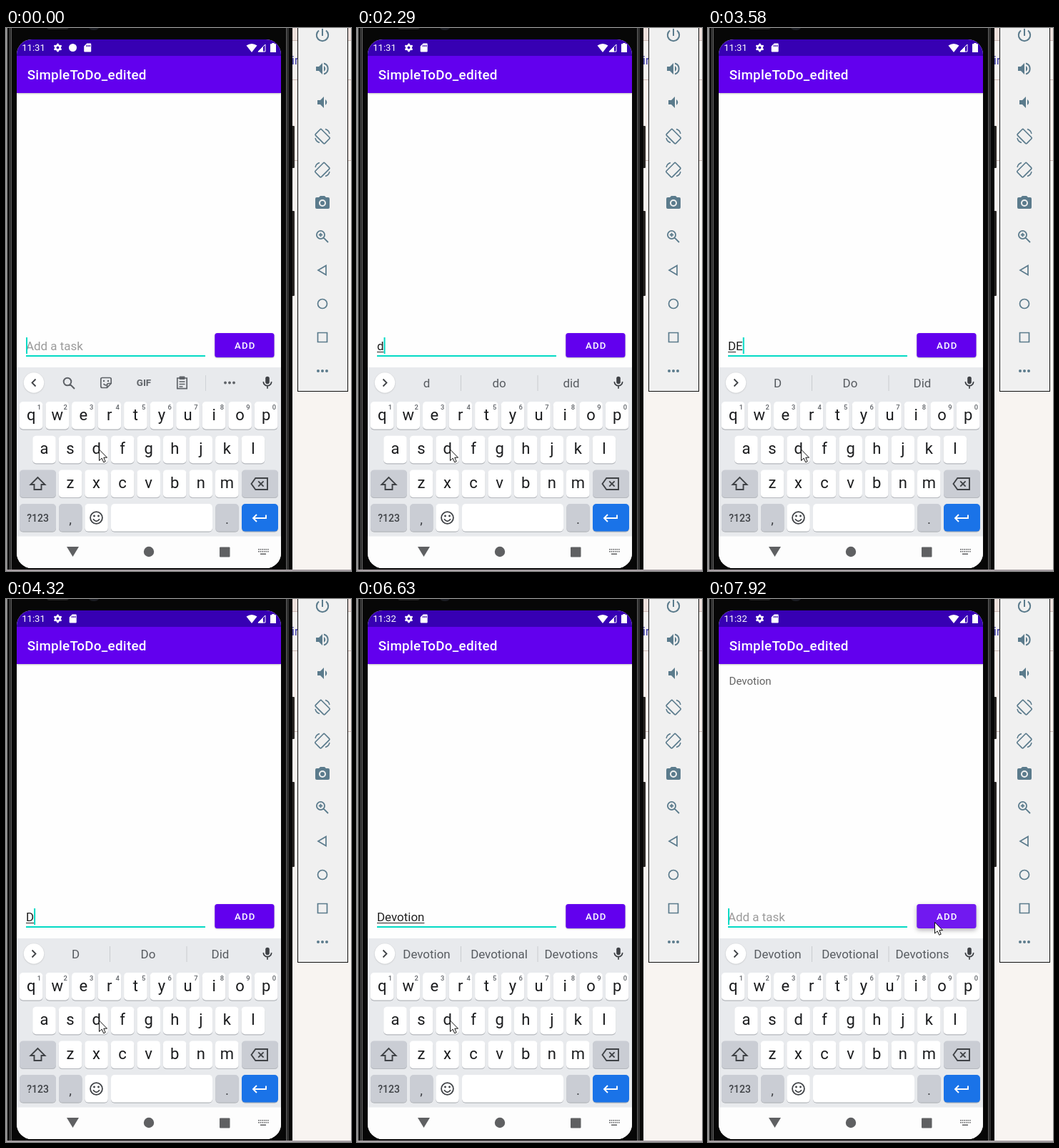
These frames come from a looping animation (483 by 760 pixels, 8000 ms). An HTML page with a canvas:

```html
<!DOCTYPE html>
<html lang="en">
<head>
<meta charset="utf-8">
<title>To-do app in a phone emulator</title>
<style>
html, body { margin: 0; width: 100%; height: 100%; overflow: hidden; }
canvas { display: block; }
</style>
</head>
<body>
<canvas id="stage" width="483" height="760"></canvas>
<script>
const ctx = document.getElementById('stage').getContext('2d');
const LOOP = 8000;
const TEAL = '#03dac5', PURPLE = '#6200ee', SLATE = '#5b7b8c', INK = '#3f4246', GREY = '#5f6368';

// time, text, underlined letters, caret on, suggestions (empty: tool row)
const typing = [
  [0, '', 0, 1, ''], [410, '', 0, 0, ''], [920, '', 0, 1, ''], [1420, '', 0, 0, ''], [1920, '', 0, 1, ''],
  [2170, 'd', 0, 1, ''], [2290, 'd', 1, 1, 'd do did'], [2660, 'd', 1, 0, 'd do did'],
  [3040, '', 0, 1, 'd do did'], [3180, '', 0, 1, ''],
  [3430, 'D', 0, 1, ''], [3580, 'DE', 1, 1, 'D Do Did'],
  [3830, 'DEV', 2, 1, 'D Do Did'], [3950, 'DEV', 3, 1, 'DEV DE DEVOTION'],
  [4200, 'DE', 2, 1, 'DEV DE DEVOTION'], [4320, 'D', 1, 1, 'D Do Did'],
  [4470, 'De', 1, 1, 'D Do Did'], [4620, 'Dev', 2, 1, 'De Dear Designed'],
  [4870, 'Dev', 3, 1, 'Dev De Deb'], [5250, 'Devo', 3, 1, 'Dev De Deb'],
  [5500, 'Devot', 4, 1, 'Devo Devote Devotion'], [5620, 'Devoti', 4, 1, 'Devo Devote Devotion'],
  [5740, 'Devotio', 4, 1, 'Devo Devote Devotion'], [5860, 'Devotion', 4, 1, 'Devo Devote Devotion'],
  [6110, 'Devotion', 8, 1, 'Devotion Devotional Devotions'],
  [6630, 'Devotion', 8, 0, 'Devotion Devotional Devotions'],
  [7020, 'Devotion', 8, 1, 'Devotion Devotional Devotions'],
  [7560, '', 0, 1, 'Devotion Devotional Devotions']
];
const pointer = [[0, 130.5, 590], [6750, 150, 573], [6870, 223, 512], [7020, 287, 491], [7170, 310, 465], [7300, 317.5, 452.5]];
const notice = [[0, 1], [410, .5], [530, .06], [670, 0]];

const at = (list, t) => list.findLast(row => row[0] <= t).slice(1);
const clamp = v => Math.max(0, Math.min(1, v));

function rect(x, y, w, h, color, r = 0) {
  ctx.fillStyle = color;
  ctx.beginPath();
  ctx.roundRect(x, y, w, h, r);
  ctx.fill();
}
function disc(x, y, r, color) {
  rect(x - r, y - r, 2 * r, 2 * r, color, r);
}
function text(s, x, y, size, color, align = 'center', weight = 400, spacing = 0) {
  ctx.font = `${weight} ${size}px Roboto, sans-serif`;
  ctx.letterSpacing = spacing + 'px';
  ctx.textAlign = align;
  ctx.fillStyle = color;
  ctx.fillText(s, x, y);
}
// Icon paths are centred on 0,0.
function icon(x, y, path, color, width = 0, flip = 1) {
  ctx.save();
  ctx.translate(x, y);
  ctx.scale(flip, 1);
  ctx.fillStyle = ctx.strokeStyle = color;
  ctx.lineWidth = width;
  const p = new Path2D(path);
  if (width) ctx.stroke(p); else ctx.fill(p, 'evenodd');
  ctx.restore();
}
function dots(x, y, gap, r, color) {
  for (const i of [-1, 0, 1]) disc(x + i * gap, y, r, color);
}
function withShadow(color, blur, dy, draw) {
  ctx.save();
  ctx.shadowColor = color;
  ctx.shadowBlur = blur;
  ctx.shadowOffsetY = dy;
  draw();
  ctx.restore();
}

function drawDesktop() {
  rect(0, 0, 483, 760, '#f8f4f1');
  rect(400, 0, 83, 18, '#eee0dc');
  rect(400, 73, 83, 112, '#faf0ec');
  for (const y of [17, 72, 185]) rect(400, y, 83, 1, '#cdb9b4');
  text('ir', 400, 51, 16, '#3030a0', 'left');
  rect(400, 137, 4, 59, '#2a2725', 1);
  rect(400, 256, 4, 119, '#2a2725', 1);
}

function drawPhone() {
  rect(0, 0, 401, 758, '#070707');
  rect(0, 0, 2, 758, '#8d8d8d');
  for (const side of [-1, 1]) {
    rect(198.5 + side * 194.5, 0, 3, 758, '#303030');
    rect(199.5 + side * 192.5, 0, 1, 758, '#5c5c5c');
  }
  rect(57, -5, 31, 7, '#242424', 4);
  rect(115, -10, 16, 13, '#1a1c22', 8);
  rect(0, 758, 483, 2, '#a79fa4');
}

function drawEmulatorBar() {
  rect(408, -2, 71, 511, '#111');
  rect(409, -2, 69, 510, '#f0f0f0');
  const x = 443, c = SLATE;
  icon(x, 10, 'M0-9V1M-5-6.5A8.2 8.2 0 1 0 5-6.5', c, 2);
  icon(x, 57, 'M-9-3v6h4l5 5V-8l-5 5zM2-4a4.6 4.6 0 0 1 0 8z', c);
  icon(x, 57, 'M2-7.5A7.8 7.8 0 0 1 2 7.5', c, 2);
  icon(x, 104, 'M-7-3v6h4l5 5V-8l-5 5zM4-4a4.6 4.6 0 0 1 0 8z', c);
  for (const [y, flip] of [[151, 1], [198, -1]]) {
    icon(x, y, 'M-9.5-2.7L-3.2-9q1-1 2 0L9.8 2q1 1 0 2L3.5 10.3q-1 1-2 0L-9.5-.7q-1-1 0-2z', c, 1.7, flip);
    icon(x, y, 'M4-9.5Q9-8 10-3M-4 9.5Q-9 8-10 3', c, 1.5, flip);
  }
  icon(x, 244, 'M-3-9L-5-7h-3q-2 0-2 2V7q0 2 2 2h16q2 0 2-2V-5q0-2-2-2H5L3-9zM0-4a5 5 0 1 1 0 10a5 5 0 1 1 0-10z', c);
  disc(x, 245, 3, c);
  icon(x - 2.5, 289.5, 'M-5.6 0a5.6 5.6 0 1 0 11.2 0a5.6 5.6 0 1 0-11.2 0M-2.7 0h5.4M0-2.7v5.4M4.2 4.2L10.5 10.5', c, 1.8);
  icon(x, 339, 'M5-6.5V6.5L-6 0z', c, 1.7);
  icon(x, 386, 'M-6.5 0a6.5 6.5 0 1 0 13 0a6.5 6.5 0 1 0-13 0', c, 1.7);
  icon(x, 433, 'M-6.5-6.5h13v13h-13z', c, 1.7);
  dots(x, 480, 6, 2, c);
}

function drawHeader(t) {
  withShadow('rgba(0,0,0,.25)', 2, .5, () => rect(15, 39, 370, 52, PURPLE));
  rect(15, 16, 370, 23, '#3700b3');
  text(t < 4470 ? '11:31' : '11:32', 22.2, 32.3, 13.1, '#fff', 'left');

  icon(72.5, 27.5, 'M-3.2 0a3.2 3.2 0 1 0 6.4 0a3.2 3.2 0 1 0-6.4 0', '#fff', 2.6);
  for (let i = 0; i < 6; i++) {
    const a = i * Math.PI / 3 + Math.PI / 6;
    disc(72.5 + 4.7 * Math.cos(a), 27.5 + 4.7 * Math.sin(a), 1.3, '#fff');
  }
  const [p] = at(notice, t);
  if (p) disc(93.5, 27.5, 5.5 * p, '#fff');
  const card = 93.7 + 20.5 * p;
  icon(card, 27.5, 'M-1-6h5q1 0 1 1V5q0 1-1 1h-8q-1 0-1-1V-2zM-1.8-3.8v2.6h1.2v-2.6zM.4-3.8v2.6h1.2v-2.6zM2.6-3.8v2.6h1.2v-2.6z', '#fff');

  icon(344, 28, 'M0 6L-7.5-3.5Q0-8.5 7.5-3.5z', '#fff');
  icon(358, 28, 'M5-5V5H-5z', '#fff', 1);
  icon(358, 28, 'M2-2V5.5H-5.5z', '#fff');
  icon(374, 27.5, 'M-1.7-6.5h3.4v1.3H4V6.5h-8V-5.2h2.3z', '#fff');

  text('SimpleToDo_edited', 29.7, 72.2, 18.84, '#fff', 'left', 500, .27);
}

function drawForm(t, [value, underlined, caret]) {
  if (t >= 7680) {
    ctx.globalAlpha = t < 7800 ? .5 : 1;
    text('Devotion', 29.5, 120, 15.07, '#646464', 'left');
    ctx.globalAlpha = 1;
  }
  text(value || 'Add a task', 28, 451.3, 16.96, value ? '#222' : '#9b9b9b', 'left');
  if (underlined) rect(28, 453, ctx.measureText(value.slice(0, underlined)).width, 1, '#222');
  const end = value ? ctx.measureText(value).width : 0;
  if (caret) rect(28 + end, 433, 2, 23, TEAL);
  rect(28, 458, 251, 2, TEAL);

  const pressed = t >= 7440;
  withShadow('rgba(0,0,0,.3)', pressed ? 6 : 2, pressed ? 2.5 : .8, () => rect(292.3, 427, 83.2, 34, PURPLE, 3.5));
  if (pressed) {
    ctx.save();
    ctx.beginPath();
    ctx.roundRect(292.3, 427, 83.2, 34, 3.5);
    ctx.clip();
    const alpha = .24 - .14 * clamp((t - 7680) / 240);
    disc(318, 453, 12 + 58 * clamp((t - 7440) / 240), `rgba(255,255,255,${alpha})`);
    ctx.restore();
  }
  text('ADD', 320, 449, 13.2, '#fff', 'left', 500, 1.2);
}

function drawStrip(suggestions) {
  withShadow('rgba(0,0,0,.2)', 2, .5, () => disc(39, 496.5, 14.2, '#fff'));
  icon(39, 496.5, 'M2.5-5L-2.5 0 2.5 5', INK, 1.8, suggestions ? -1 : 1);
  icon(366, 496.5, 'M-2.8-6a2.8 2.8 0 0 1 5.6 0v5a2.8 2.8 0 0 1-5.6 0z', INK);
  icon(366, 496.5, 'M-5.7-1.5a5.7 5.7 0 0 0 11.4 0M0 4.5V8.3', INK, 1.7);
  if (suggestions) {
    suggestions.split(' ').forEach((word, i) => text(word, [97.5, 199, 300][i], 503.3, 16.96, '#585c61'));
    for (const x of [145, 252.5]) rect(x, 486, 1, 22, '#c9ccd0');
    return;
  }
  const c = GREY;
  icon(86, 495, 'M-5.3 0a5.3 5.3 0 1 0 10.6 0a5.3 5.3 0 1 0-10.6 0M4 4L10 10', c, 2);
  icon(140, 496.5, 'M7.2 1V-5q0-2-2-2h-10.4q-2 0-2 2V5q0 2 2 2H1.5zM1.5 7V3q0-2 2-2h3.7M-3.5 1.5q2 2.5 4 1.5', c, 1.7);
  disc(137, 494, 1.2, c);
  disc(143, 494, 1.2, c);
  text('GIF', 193, 501.3, 13.4, c, 'center', 700);
  icon(246.5, 497, 'M-6.7-7h13.4V7.7h-13.4zM-4-2h8M-4 1.5h8M-4 5h5', c, 1.7);
  rect(242.5, 487.5, 8, 4.5, c, 1);
  rect(279, 486, 1, 22, '#d0d3d7');
  dots(313, 496.5, 6, 1.9, c);
}

const PITCH = 36.55, ROW = 47.7;
function key(x, row, w, color = '#fff') {
  const y = 523 + row * ROW;
  rect(x, y + 1, w, 38.7, '#b4b7bc', 5);
  rect(x, y, w, 38.5, color, 5);
}

function drawKeyboard(t, suggestions) {
  rect(15, 475, 370, 237, '#e8eaed');
  drawStrip(suggestions);
  const upper = t >= 3430 && t < 3580;
  ['qwertyuiop', 'asdfghjkl', 'zxcvbnm'].forEach((letters, row) => {
    [...letters].forEach((letter, i) => {
      const x = [35.2, 53.5, 90][row] + i * PITCH;
      key(x - 16.3, row, 32.6);
      text(upper ? letter.toUpperCase() : letter, x, [549, 596, 644][row], 22, '#1b1c1e');
      if (!row) text((i + 1) % 10, x + 11.3, 534, 9.4, GREY, 'center', 500);
    });
  });

  const tint = '#cacdd4';
  key(19, 2, 51, tint);
  key(330, 2, 51, tint);
  icon(44.5, 638, 'M0-9L-10 1h5v7h10v-7h5z', INK, 1.9);
  icon(355, 638, 'M-11.5 0L-5.7-8H11V8H-5.7zM-1.8-3.7l7.4 7.4M5.6-3.7l-7.4 7.4', INK, 1.9);

  key(19, 3, 51, tint);
  key(74, 3, 32.5, tint);
  key(110.3, 3, 32.5);
  key(147, 3, 142);
  key(293.3, 3, 32.5, tint);
  key(330, 3, 51, '#1a73e8');
  text('?123', 44.5, 690.8, 14, INK, 'center', 500);
  text(',', 90, 694, 19, INK);
  text('.', 309.5, 694, 19, INK);
  icon(126.5, 685.5, 'M-8.4 0a8.4 8.4 0 1 0 16.8 0a8.4 8.4 0 1 0-16.8 0M-4.5 1.8q4.5 6 9 0', INK, 1.8);
  disc(123.5, 683, 1.4, INK);
  disc(129.5, 683, 1.4, INK);
  icon(355, 686, 'M9-4.5V0H-8M-4-5L-9 0l5 5', '#fff', 1.9);

  if (t >= 2050 && t < 2170) {
    withShadow('rgba(0,0,0,.3)', 4, 1, () => rect(108, 518, 37, 92, '#fff', 6));
    text('d', 126.5, 553, 29, '#1b1c1e');
  }
}

function drawNavigation() {
  rect(15, 711.5, 370, 45, '#fdfdfd');
  const c = '#5f6062';
  icon(93.5, 733, 'M-8.5-7h17L0 7z', c);
  disc(200, 733, 7.2, c);
  rect(299, 726.5, 14.5, 14, c, 1);
  for (let i = 0; i < 12; i++) rect(353 + i % 6 * 2.6, 729 + Math.floor(i / 6) * 3, 1.6, 1.6, c);
  rect(356, 735.5, 8, 1.6, c);
}

function drawPointer(x, y) {
  const arrow = 'M0 0V15.5L3.7 12.2 6.2 17.8 8.7 16.7 6.3 11.2H11z';
  icon(x, y, arrow, '#fff');
  icon(x, y, arrow, '#111', 1);
}

function draw(t) {
  const [value, underlined, caret, suggestions] = at(typing, t);
  drawDesktop();
  drawPhone();
  ctx.save();
  ctx.beginPath();
  ctx.roundRect(15, 16, 370, 740, 21);
  ctx.clip();
  rect(15, 16, 370, 740, '#fefefe');
  drawHeader(t);
  drawForm(t, [value, underlined, caret]);
  drawKeyboard(t, suggestions);
  drawNavigation();
  ctx.restore();
  drawEmulatorBar();
  drawPointer(...at(pointer, t));
}

function tick() {
  draw(performance.now() % LOOP);
  requestAnimationFrame(tick);
}
tick();
</script>
</body>
</html>
```
